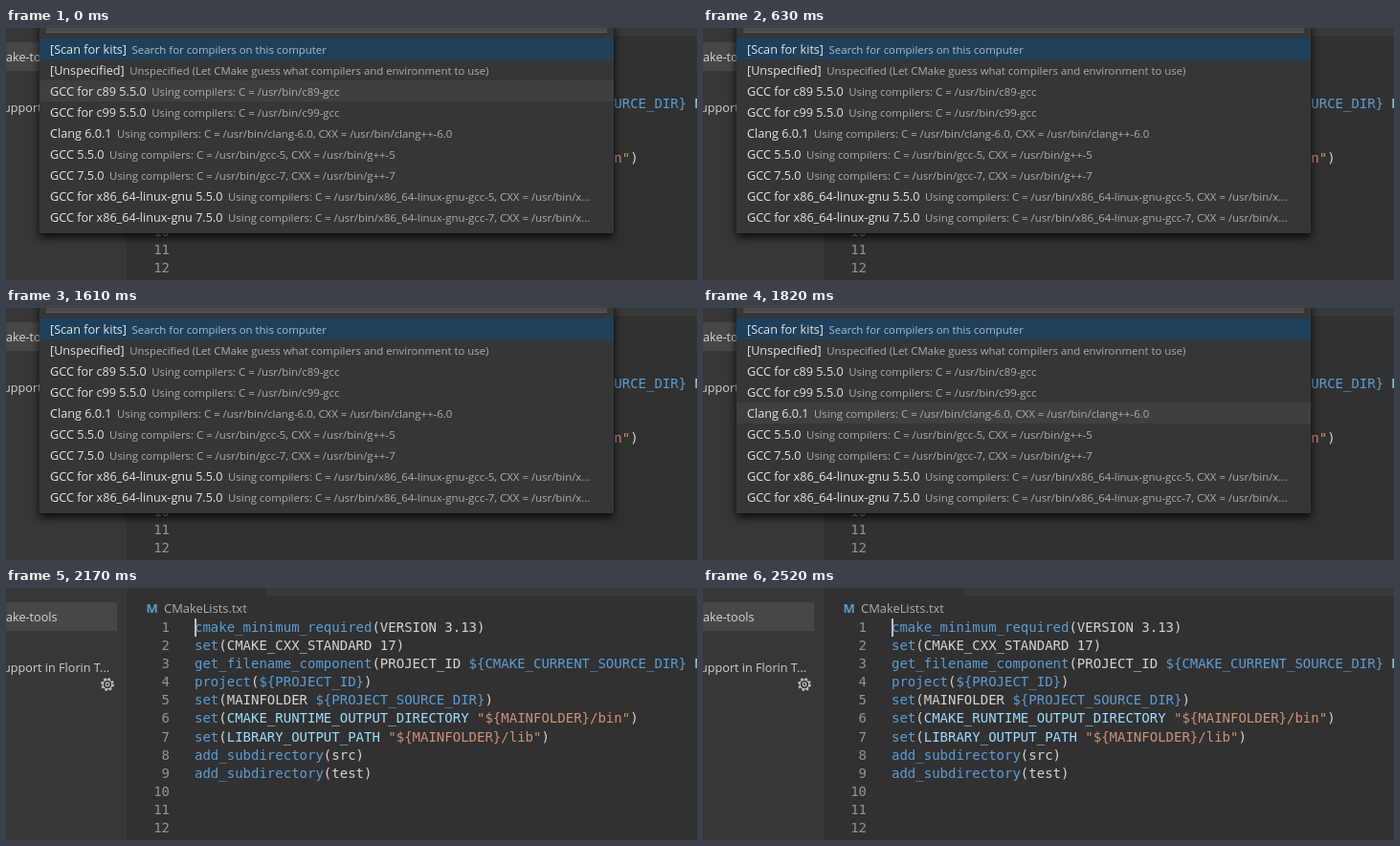
Animation of 722x264 px, one loop 2590 ms. Source, as an HTML page with a canvas:

```html
<!DOCTYPE html>
<html lang="en">
<head>
<meta charset="utf-8">
<title>Choosing a compiler kit</title>
<style>
  html, body { margin: 0; width: 722px; height: 264px; overflow: hidden; background: #313131; }
  canvas { display: block; }
</style>
</head>
<body>
<canvas id="stage" width="722" height="264"></canvas>
<script>
const ctx = document.getElementById('stage').getContext('2d');
const LOOP = 2590, MENU_CLOSES = 2170;
const UI = '"Open Sans", "Noto Sans", sans-serif';
const MONO = '14px "DejaVu Sans Mono", monospace';
const WHITE = '#d4d4d4', BLUE = '#5b9dd5', PALE = '#9cdcfe', ORANGE = '#ce9178';

// Each line is a list of [text, colour] runs.
const code = [
  [['cmake_minimum_required', BLUE], ['(VERSION 3.13)', WHITE]],
  [['set', BLUE], ['(CMAKE_CXX_STANDARD 17)', WHITE]],
  [['get_filename_component', BLUE], ['(PROJECT_ID ', WHITE], ['${CMAKE_CURRENT_SOURCE_DIR}', BLUE], [' NAME)', PALE]],
  [['project', BLUE], ['(', WHITE], ['${PROJECT_ID}', BLUE], [')', WHITE]],
  [['set', BLUE], ['(MAINFOLDER ', WHITE], ['${PROJECT_SOURCE_DIR}', BLUE], [')', WHITE]],
  [['set', BLUE], ['(', WHITE], ['CMAKE_RUNTIME_OUTPUT_DIRECTORY', PALE], [' "${MAINFOLDER}/bin"', ORANGE], [')', WHITE]],
  [['set', BLUE], ['(', WHITE], ['LIBRARY_OUTPUT_PATH', PALE], [' "${MAINFOLDER}/lib"', ORANGE], [')', WHITE]],
  [['add_subdirectory', BLUE], ['(src)', WHITE]],
  [['add_subdirectory', BLUE], ['(test)', WHITE]]
];

const using = (c, cxx) => `Using compilers: C = /usr/bin/${c}` + (cxx ? `, CXX = /usr/bin/${cxx}` : '');
const kits = [
  ['[Scan for kits]', 'Search for compilers on this computer'],
  ['[Unspecified]', 'Unspecified (Let CMake guess what compilers and environment to use)'],
  ['GCC for c89 5.5.0', using('c89-gcc')],
  ['GCC for c99 5.5.0', using('c99-gcc')],
  ['Clang 6.0.1', using('clang-6.0', 'clang++-6.0')],
  ['GCC 5.5.0', using('gcc-5', 'g++-5')],
  ['GCC 7.5.0', using('gcc-7', 'g++-7')],
  ['GCC for x86_64-linux-gnu 5.5.0', using('x86_64-linux-gnu-gcc-5', 'x...')],
  ['GCC for x86_64-linux-gnu 7.5.0', using('x86_64-linux-gnu-gcc-7', 'x...')]
];

// [start time, hovered row]; the pointer leaves below the menu and returns.
const hovers = [[0, 2], [70, 3], [140, 5], [210, 6], [280, 8], [350, -1], [1680, 8], [1750, 6], [1820, 4]];

function rect(x, y, w, h, color) {
  ctx.fillStyle = color;
  ctx.fillRect(x, y, w, h);
}

// Draws text and returns the x where it ends.
function text(str, x, y, color, font) {
  ctx.font = font;
  ctx.fillStyle = color;
  ctx.fillText(str, x, y);
  return x + ctx.measureText(str).width;
}

function ring(x, y, r, width, dash = []) {
  ctx.lineWidth = width;
  ctx.setLineDash(dash);
  ctx.beginPath();
  ctx.arc(x, y, r, 0, 2 * Math.PI);
  ctx.stroke();
}

function drawSidebar() {
  rect(0, 0, 126, 264, '#373738');
  rect(0, 15, 116, 30, '#474748');
  text('ake-tools', 0, 35, '#d4d4d4', `12.65px ${UI}`);
  text('upport in Florin T...', -3, 88, '#d0d0d0', `12.65px ${UI}`);
  ctx.strokeStyle = '#c4c4c4';
  ring(106, 101, 4.8, 1.2);
  ring(106, 101, 1.8, 1.2);
  ring(106, 101, 6, 1.8, [Math.PI * 0.75, Math.PI * 0.75]);
}

function drawEditor() {
  rect(126, 0, 596, 264, '#313131');
  rect(272, 0, 450, 9, '#39393a');
  text('M', 146.5, 26, '#5b9bc4', `bold 13px ${UI}`);
  text('CMakeLists.txt', 165, 26, '#adadad', `12.9px ${UI}`);
  for (let i = 0; i < 12; i++) {
    const y = Math.round(45.9 + 19.1 * i);
    ctx.textAlign = 'right';
    text(i + 1, 171, y, '#949494', MONO);
    ctx.textAlign = 'left';
    let x = 197;
    for (const [run, color] of code[i] || []) x = text(run, x, y, color, MONO);
  }
  rect(197, 32, 2, 19, '#c0c0c0');
}

function drawMenu(t) {
  ctx.save();
  ctx.shadowColor = 'rgba(0, 0, 0, 0.85)';
  ctx.shadowBlur = 9;
  ctx.shadowOffsetY = 4;
  rect(35, -10, 600, 225, '#353637');
  ctx.restore();
  rect(42, 0, 586, 5, '#494a4b');
  rect(42, 4, 586, 1, '#5a6066');
  rect(35, 11, 600, 22, '#1f405a');
  const hovered = hovers.filter(([start]) => start <= t).pop()[1];
  if (hovered >= 0) rect(35, 11 + 22 * hovered, 600, 22, '#3e3f41');
  kits.forEach(([label, detail], i) => {
    const y = 27 + 22 * i;
    const end = text(label, 46, y, '#e4e4e4', `12.65px ${UI}`);
    text(detail, end + 5.5, y, i ? '#adadad' : '#aebac3', `11.4px ${UI}`);
  });
}

function draw() {
  const t = performance.now() % LOOP;
  drawSidebar();
  drawEditor();
  if (t < MENU_CLOSES) drawMenu(t);
  requestAnimationFrame(draw);
}
draw();
</script>
</body>
</html>
```
